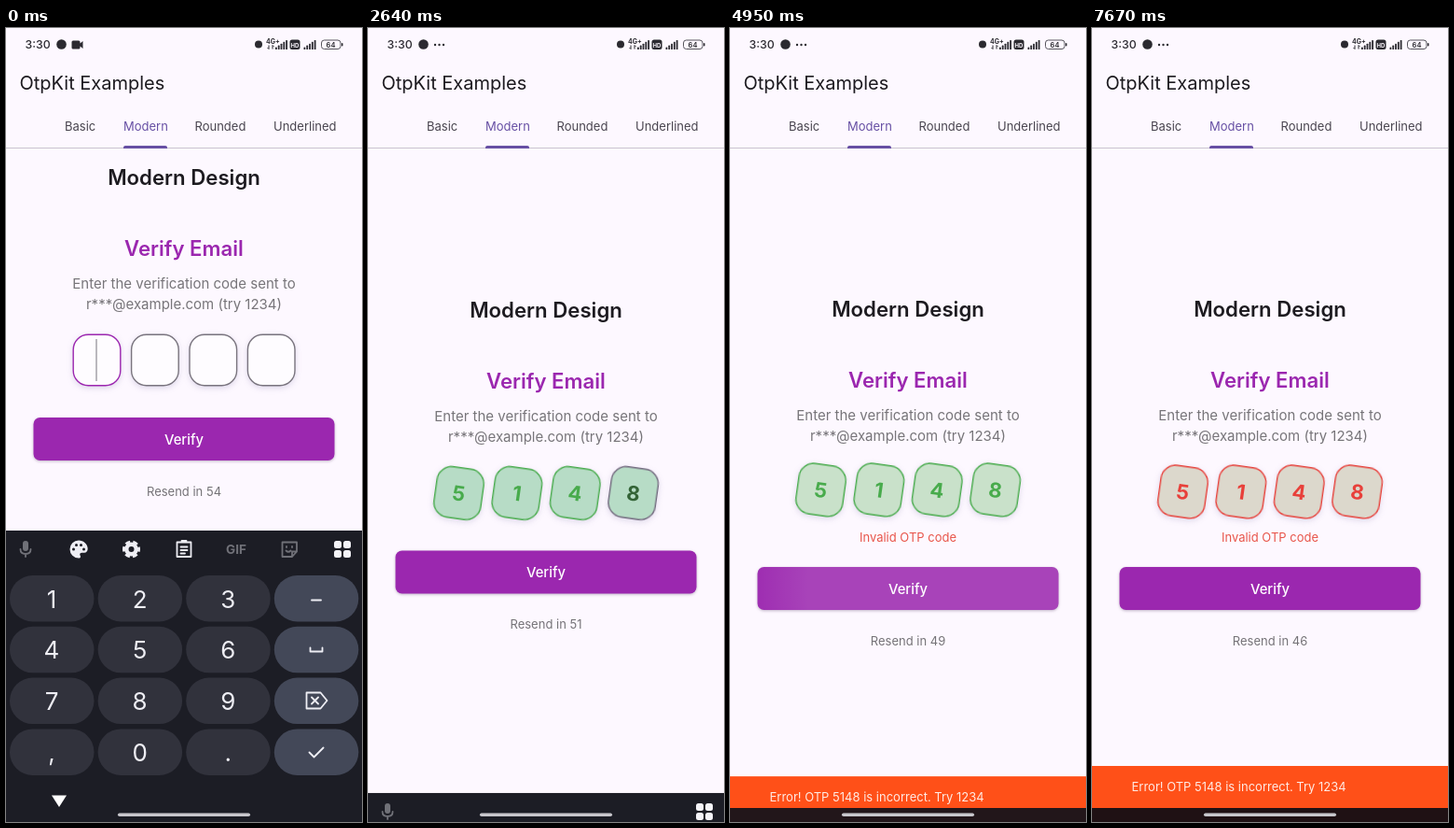
Write an HTML page that moves like this. It is 382 by 850 pixels and loops after 7710 ms.

```html
<!DOCTYPE html>
<html lang="en">
<head>
<meta charset="utf-8">
<title>OTP entry</title>
<style>
  html, body { margin: 0; width: 100%; height: 100%; overflow: hidden; background: #fdf8ff; }
  svg { display: block; width: 100vw; height: 100vh; font-family: Inter, Roboto, sans-serif; }
  .mid { text-anchor: middle; }
  .tab { font-size: 13px; fill: #49454f; }
  .body { font-size: 15px; fill: #777579; }
  .small { font-size: 13px; fill: #757377; }
  .head { font-size: 22.2px; font-weight: 600; }
  .box { stroke-width: 1.4; filter: drop-shadow(0 2px 3px #5a509030); }
  .digit { font-size: 22px; font-weight: 700; }
  .button { fill: #9b27af; filter: drop-shadow(0 1px 1.5px #40205050); }
  .key { font-size: 26px; fill: #eeeef4; }
  .line { fill: none; stroke: #eeeef4; stroke-width: 1.8; stroke-linecap: round; stroke-linejoin: round; }
  .dim { opacity: .4; }
</style>
</head>
<body>
<svg viewBox="0 0 382 850">
  <defs>
    <clipPath id="pane"><rect width="382" height="835"/></clipPath>
    <clipPath id="pill"><rect x="29.5" y="417" width="323" height="46" rx="7"/></clipPath>
    <radialGradient id="glow">
      <stop offset=".7" stop-color="#fff"/>
      <stop offset="1" stop-color="#fff" stop-opacity="0"/>
    </radialGradient>
  </defs>
  <rect width="382" height="850" fill="#fdf8ff"/>

  <g fill="#2b2a30">
    <text x="20.5" y="22" font-size="12.3" font-weight="500">3:30</text>
    <circle cx="59.5" cy="17.5" r="5.3"/>
    <path id="camera" d="M72 13.5h6q1.5 0 1.5 1.5v1.5l3-2.500v8l-3-2.500v1.500q0 1.500-1.500 1.500h-6q-1.500 0-1.500-1.500v-6q0-1.500 1.500-1.500z"/>
    <g id="dots"><circle cx="72" cy="18" r="1.2"/><circle cx="76.500" cy="18" r="1.2"/><circle cx="81" cy="18" r="1.2"/></g>
    <circle cx="271" cy="17.5" r="4"/>
    <text x="279" y="17" font-size="7" font-weight="700">4G+</text>
    <path d="M282 22.500v-4m-1.500 2.500l1.500 1.500M286 18.500v4m1.500-2.500l-1.500-1.500" fill="none" stroke="#2b2a30"/>
    <g id="bars"></g>
    <rect x="304.500" y="12.500" width="11" height="10.500" rx="2.500"/>
    <text class="mid" x="310" y="20.500" font-size="6" font-weight="700" fill="#fdf8ff">HD</text>
    <rect x="338.500" y="13" width="20.500" height="9.500" rx="3" fill="none" stroke="#56545c"/>
    <rect x="360" y="16" width="1.500" height="3.500" rx=".7"/>
    <text class="mid" x="348.500" y="20.600" font-size="7.500" font-weight="600">64</text>
  </g>

  <text x="14.500" y="65.500" font-size="20" fill="#1d1b20">OtpKit Examples</text>
  <g class="tab">
    <text x="63" y="110">Basic</text>
    <text x="126" y="110" fill="#6750a4">Modern</text>
    <text x="202.500" y="110">Rounded</text>
    <text x="287" y="110">Underlined</text>
  </g>
  <path d="M0 128.500H382" stroke="#cac4d0"/>
  <path d="M126 129v-1q0-2 2-2h43q2 0 2 2v1z" fill="#6750a4"/>

  <g id="page" class="mid">
    <text class="head" x="191" y="168" fill="#1d1b20">Modern Design</text>
    <text class="head" x="191" y="244" fill="#9b27af">Verify Email</text>
    <text class="body" x="191" y="279">Enter the verification code sent to</text>
    <text class="body" x="191" y="301">r***@example.com (try 1234)</text>
    <g id="boxes"></g>
    <path id="cursor" d="M0 333v45" stroke="#76747c"/>
    <text id="invalid" x="191" y="550" dy="-141" font-size="13" fill="#e8554a">Invalid OTP code</text>
    <g id="foot">
      <rect class="button" x="29.500" y="417" width="323" height="46" rx="7"/>
      <g clip-path="url(#pill)"><circle id="ripple" cx="250" cy="440" fill="url(#glow)"/></g>
      <text x="191" y="446" font-size="14.800" font-weight="500" fill="#fff">Verify</text>
      <text id="resend" class="small" x="191" y="501"></text>
    </g>
  </g>

  <g clip-path="url(#pane)">
    <g id="snack">
      <rect width="382" height="46" fill="#ff5018"/>
      <text x="42.500" y="27" font-size="13" fill="#ffeae4">Error! OTP 5148 is incorrect. Try 1234</text>
    </g>
  </g>
  <rect id="nav" y="835" width="382" height="15"/>

  <g id="keyboard">
    <rect y="538" width="382" height="312" fill="#1c1d25"/>
    <g id="keys"></g>
    <g class="dim">
      <rect x="18" y="549" width="6" height="11" rx="3" fill="#eeeef4"/>
      <path class="line" d="M15.500 558q0 5 5.500 5t5.500-5M21 563v3"/>
    </g>
    <g id="tools">
      <path d="M78 548.500a9.500 9.500 0 0 0 0 19c2.500 0 2.200-2 1.500-3-.8-1.700.3-2.700 2-2.700h2.500c2.200 0 3.700-2 3.700-4.300 0-5-4.500-9-9.700-9z" fill="#eeeef4"/>
      <g fill="#1c1d25"><circle cx="72.500" cy="558" r="1.500"/><circle cx="75.500" cy="553.500" r="1.500"/><circle cx="80.500" cy="553.500" r="1.500"/><circle cx="83.500" cy="558" r="1.500"/></g>
      <g fill="none" stroke="#eeeef4">
        <circle cx="134.500" cy="558" r="8" stroke-width="3" stroke-dasharray="5.200 3.178" stroke-dashoffset="2.600"/>
        <circle cx="134.500" cy="558" r="5.200" stroke-width="4.400"/>
      </g>
      <path class="line" d="M183.500 550.500h15v15.500h-15zM187.500 555.500h7M187.500 559h7M187.500 562.500h4.500M188.500 549h5"/>
      <g class="dim">
        <text class="mid" x="247" y="563" font-size="13.500" font-weight="700" fill="#eeeef4">GIF</text>
        <path class="line" d="M296.500 550.500h15.500v10l-5 5.500h-10.500zM312 560.500h-5v5.500M301 555v1M307 555v1M300.500 559.500q2.500 2.500 5 0"/>
      </g>
    </g>
    <g fill="#f4f4f8"><rect x="352" y="549" width="8" height="8" rx="2.500"/><rect x="362" y="549" width="8" height="8" rx="2.500"/><rect x="352" y="559" width="8" height="8" rx="2.500"/><rect x="362" y="559" width="8" height="8" rx="2.500"/></g>
    <path class="line" d="M328 612.500h10M326.500 663.500v4h13v-4M322.500 711.500h15l7 8.500-7 8.500h-15zM328 716.500l7 7m0-7l-7 7M325.500 775.500l5 5 10-10"/>
    <path d="M49 821.500h16l-8 12.500z" fill="#fff"/>
  </g>
  <rect x="120" y="840.500" width="142" height="3.500" rx="1.750" fill="#c8c7cc"/>
</svg>
<script>
const LOOP = 7710, CODE = '5148', TYPED = [700, 1160, 1850, 2480];
const HIDE = 2480, TAP = 4620, ERROR = 4750;
const PURPLE = '#9c27b0', GREEN = '#48ab4c', RED = '#e8403a', GREY = '#79747e', INK = '#1d1b20';

const $ = id => document.getElementById(id);
const ramp = (t, start, span) => Math.min(1, Math.max(0, (t - start) / span));
const mix = (a, b, p) => `color-mix(in srgb, ${b} ${p * 100}%, ${a})`;
const move = (node, x, y) => node.setAttribute('transform', `translate(${x} ${y})`);
const show = (node, on) => node.style.opacity = +on;
const boxX = i => 97.5 + 62.4 * i;

function add(parent, tag, attrs, text = '') {
  const node = document.createElementNS('http://www.w3.org/2000/svg', tag);
  for (const k in attrs) node.setAttribute(k, attrs[k]);
  node.textContent = text;
  return parent.appendChild(node);
}

for (const x of [289, 319.5])
  for (let i = 0; i < 5; i++)
    add($('bars'), 'rect', { x: x + i * 2.8, y: 20.5 - i * 1.9, width: 1.8, height: 2.5 + i * 1.9, rx: .6 });

[...'123 456 789 ,0. '].forEach((label, i) => {
  const col = i % 4, x = 4 + col * 94.6, y = 586 + (i >> 2) * 54.8;
  add($('keys'), 'rect', { x, y, width: 90.5, height: 49.5, rx: 24.7, fill: col < 3 ? '#31323c' : '#434858' });
  if (col < 3) add($('keys'), 'text', { x: x + 45, y: y + 34.5, class: 'key mid' }, label);
});

const boxes = [...CODE].map(n => {
  const g = add($('boxes'), 'g', {});
  return {
    g,
    frame: add(g, 'rect', { x: -25.3, y: -27.3, width: 50.6, height: 54.6, rx: 16, class: 'box' }),
    digit: add(g, 'text', { y: 8, class: 'digit' }, n)
  };
});

function draw(t) {
  const failed = t >= ERROR, red = ramp(t, 4960, 300);
  const slide = 312 * (1 - (1 - ramp(t, HIDE, 300)) ** 3);
  move($('keyboard'), 0, slide);
  show($('tools'), 1 - ramp(t, HIDE, 120));
  move($('page'), 0, failed ? 141 : Math.min(slide * .507, 150));
  move($('foot'), 0, failed ? 19 : 0);
  show($('invalid'), failed);
  show($('camera'), t < 600);
  show($('dots'), t >= 600);
  $('resend').textContent = 'Resend in ' + (54 - Math.floor((t + 930) / 1000));

  const bob = -2 * Math.sin(Math.PI * ramp(t, 4800, 300));
  let fill = mix('#fefcff', '#b7dcc6', ramp(t, HIDE, 120));
  fill = mix(fill, '#c9e1ca', ramp(t, 2700, 600));
  fill = mix(fill, '#dcd8cc', red);
  boxes.forEach(({ g, frame, digit }, i) => {
    const focus = i ? ramp(t, TYPED[i - 1], 320) : 1;
    const done = ramp(t, TYPED[i], 320);
    const edge = mix(mix(GREY, PURPLE, focus), GREEN, done);
    g.setAttribute('transform', `translate(${boxX(i)} ${355.5 + bob}) rotate(${8 * ramp(t, TYPED[i], 150)})`);
    frame.style.stroke = mix(edge, RED, red);
    frame.style.fill = fill;
    digit.style.fill = mix(mix(INK, GREEN, done), RED, red);
    show(digit, t >= TYPED[i]);
  });

  const count = TYPED.filter(s => t >= s).length;
  const since = t - (count ? TYPED[count - 1] : 0);
  move($('cursor'), boxX(count) - .5, 0);
  show($('cursor'), count < 4 && since % 1000 < 500);

  $('ripple').setAttribute('r', 360 * ramp(t, TAP, 500));
  show($('ripple'), .13 * (1 - ramp(t, 5000, 250)));

  const rise = 1 - (1 - ramp(t, ERROR, 400)) ** 2;
  move($('snack'), 0, 835 - 45 * rise);
  $('nav').style.fill = mix('#2a272c', '#1f1114', rise);
}

const start = performance.now();
function tick() {
  draw((performance.now() - start) % LOOP);
  requestAnimationFrame(tick);
}
tick();
</script>
</body>
</html>
```
